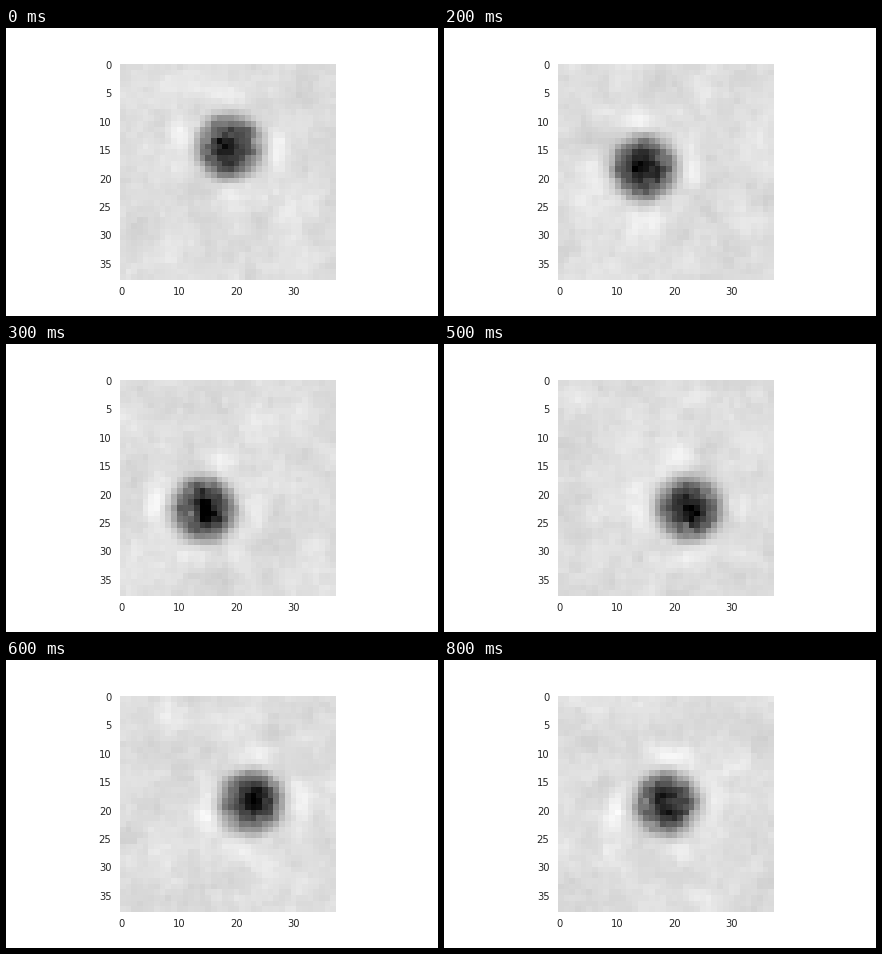
A matplotlib script that plays this animation: 432 px wide and 288 px high, repeating every 900 ms.

```python
import numpy as np
import matplotlib.pyplot as plt
from matplotlib.animation import FuncAnimation
from matplotlib.transforms import ScaledTranslation

N = 38
STEPS = 9
STEP_MS = 100
BACKGROUND = 221
ROWS, COLS = np.mgrid[0:N, 0:N].astype(float)


def cell_center(step):
    """Anticlockwise round a 3 x 3 grid from the top, then to its middle."""
    if step == STEPS - 1:
        return 18.5, 18.3
    angle = np.pi / 2 + step * np.pi / 4
    return 18.5 + 4.1 * np.round(np.cos(angle)), 18 - 4.1 * np.round(np.sin(angle))


def bump(x, y, sx, sy):
    return np.exp(-((COLS - x) / sx) ** 2 / 2 - ((ROWS - y) / sy) ** 2 / 2)


def disc(x, y, radius, soft=0.5):
    dist = np.hypot(COLS - x, ROWS - y)
    return 1 / (1 + np.exp((dist - radius) / soft))


def smooth_noise(rng, spread):
    d = np.arange(N)[:, None] - np.arange(N)[None, :]
    kernel = np.exp(-d ** 2 / (2 * spread ** 2))
    field = kernel @ rng.standard_normal((N, N)) @ kernel.T
    return (field - field.mean()) / field.std()


def patch(step):
    rng = np.random.default_rng(40 + step)
    x, y = cell_center(step)
    img = BACKGROUND + 4 * smooth_noise(rng, 1.8) + 3 * smooth_noise(rng, 0.6)

    # One light patch on each side of the cell
    for side in range(4):
        angle = side * np.pi / 2 + rng.normal(0, 0.15)
        px, py = x + 8.8 * np.cos(angle), y + 8.8 * np.sin(angle)
        sx, sy = (1.3, 2.4) if side % 2 == 0 else (2.2, 1.4)
        img += rng.uniform(14, 26) * bump(px, py, sx, sy)

    # Pale fringe, grey body and black core, each a little off centre
    fx, fy, kx, ky = rng.uniform(-0.5, 0.5, 4)
    body = disc(x, y, 5.1)
    img -= 48 * disc(x + fx, y + fy, 6.1)
    img -= body * (58 + 15 * smooth_noise(rng, 0.5))
    img -= 112 * bump(x + kx, y + ky, 2, 2.2)
    return np.clip(img, 0, 252)


plt.rcParams.update({"font.family": "DejaVu Sans", "font.size": 10})
fig = plt.figure(figsize=(6, 4), dpi=72, facecolor="white")
ax = fig.add_axes([113.4 / 432, 0.125, 0.5, 0.75])
shift = 0.6 * N / 216  # lines the image up with whole pixels
frames = [patch(i) for i in range(STEPS)]
image = ax.imshow(frames[0], cmap="gray", vmin=0, vmax=255,
                  interpolation="nearest", aspect="auto", clip_on=False,
                  extent=(-0.5 + shift, N - 0.5 + shift, N - 0.5, -0.5))
ax.set(xlim=(-0.5, N - 0.5), ylim=(N - 0.5, -0.5), yticks=range(0, 36, 5))
ticks = np.arange(0, 31, 10)
ax.set_xticks(15 + 1.007 * (ticks - 15), [str(t) for t in ticks])
ax.set_frame_on(False)
ax.tick_params(length=0, pad=7, labelcolor="0.15")
nudge = ScaledTranslation(-1 / 72, 1 / 72, fig.dpi_scale_trans)
for label in ax.get_yticklabels():
    label.set_va("center")
    label.set_transform(label.get_transform() + nudge)


def draw(step):
    image.set_data(frames[step])
    return [image]


anim = FuncAnimation(fig, draw, frames=STEPS, interval=STEP_MS,
                     repeat=True, repeat_delay=0, blit=False)
plt.show()
```
